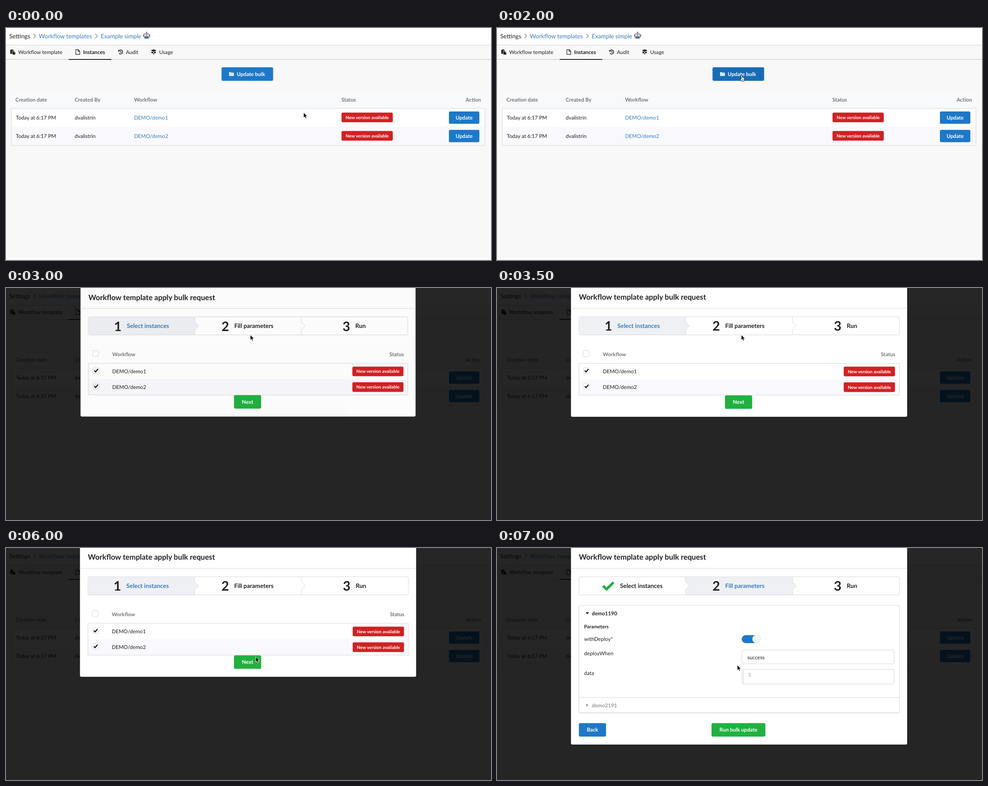
These frames come from a looping animation (1083x517 px, 8000 ms). An HTML page:

```html
<!DOCTYPE html>
<html lang="en">
<head>
<meta charset="utf-8">
<title>Bulk update</title>
<style>
html, body { margin: 0; width: 100%; height: 100%; overflow: hidden; background: #f8f8f8; }
svg { display: block; width: 1083px; height: 517px; }
text { font-family: Lato, sans-serif; text-rendering: geometricPrecision; white-space: pre; }
</style>
</head>
<body>
<svg id="stage" viewBox="0 0 1083 517"></svg>
<script>
const BASE = 11.67, LARGE = 13.33;
const INK = '#212121', GREY = '#767676', LINK = '#3b7abf', LINE = '#d6d6d8';
const BLUE = '#1e78c8', BLUE_HOVER = '#186cb6', BLUE_DOWN = '#1b609f';
const GREEN = '#20b140', GREEN_HOVER = '#17a136', RED = '#d32024';
const ACTIVE = '#eff0f4', STRIPE = '#f9f9fd';

const text = (s, x, y, { size = BASE, bold, fill = INK, anchor = 'start' } = {}) =>
  `<text x="${x}" y="${y}" font-size="${size}" font-weight="${bold ? 700 : 400}" fill="${fill}" text-anchor="${anchor}">${s}</text>`;
const rect = (x, y, w, h, fill, extra = '') =>
  `<rect x="${x}" y="${y}" width="${w}" height="${h}" fill="${fill}" ${extra}/>`;
const path = (d, extra) => `<path d="${d}" ${extra}/>`;
const stroke = (color, w = 1) => `fill="none" stroke="${color}" stroke-width="${w}"`;
const frame = (x, y, w, h, fill = '#fff', r = 3) =>
  rect(x, y, w, h, fill, `rx="${r}" stroke="${LINE}"`);
const group = (id, body) => `<g id="${id}">${body}</g>`;

const button = (label, x, y, w, h, fill, id = '') =>
  rect(x, y, w, h, fill, `rx="3.3" ${id && `id="${id}"`}`) +
  text(label, x + w / 2, y + h / 2 + 4.1, { bold: true, fill: '#fff', anchor: 'middle' });

const badge = (x, y) =>
  rect(x, y, 114.5, 21.5, RED, 'rx="3"') +
  text('New version available', x + 57.25, y + 14.2, { size: 10, bold: true, fill: '#fff', anchor: 'middle' });

const checkbox = (x, y, on) =>
  frame(x, y, 13.4, 13.4, '#fff', 2.5) +
  (on ? path(`M${x + 2.6} ${y + 6.6}l3 3.1l5.4-6.6`, stroke('#111', 2.3)) : '');

const chevron = x => path(`M${x} 13.3l4.6 4.7l-4.6 4.7`, stroke('#a8a8a8', 2));

const icons = {
  paste: path('M9.6 48.4h2.2a1.7 1.7 0 0 1 3 0h2.2v2.2h-3.4v7h-4z', 'fill="#1b1b1b"') +
    path('M14.4 51.4h3.6l2.6 2.6v5.2h-6.2z', 'fill="#1b1b1b"') +
    path('M17.9 51.6v2.6h2.6', stroke('#f8f8f8', .7)),
  file: path('M156 48.1h5.2l3.4 3.4v7.4h-8.6zM161 48.3v3.5h3.5', stroke('#1b1b1b', 1.2)),
  history: path('M252.4 50.6a4.6 4.6 0 1 1-.2 5.4M256.3 50.6v3.2l2 1.3', stroke('#1b1b1b', 1.5)) +
    path('M250.6 48.3v4.2h4.2z', 'fill="#1b1b1b"'),
  signs: path('M325 48.6h8.6l1.8 1.6l-1.8 1.6h-8.6zM334.4 53h-8.6l-1.8 1.6l1.8 1.6h8.6zM329 47.4h1.4v12h-1.4z', 'fill="#1b1b1b"'),
  folder: path('M498 99.2q0-1 1-1h3l1.2 1.4h4.8q1 0 1 1v5.4q0 1-1 1h-9q-1 0-1-1z', 'fill="#d4e5f5"'),
  robot: rect(306, 14, 16, 6, '#cf4c43', 'rx="2"') +
    path('M314 9.5v3', stroke('#777', 1.4)) + '<circle cx="314" cy="9.7" r="1.5" fill="#cf4c43"/>' +
    rect(307.8, 11.6, 12.4, 12.6, '#8fa9b8', 'rx="3.5"') +
    '<circle cx="311.2" cy="16" r="1.8" fill="#e9f6fa"/><circle cx="316.8" cy="16" r="1.8" fill="#e9f6fa"/>' +
    rect(310, 19.8, 8, 2.4, '#4a4f55', 'rx="1"'),
};

function page() {
  const head = { bold: true, fill: GREY };
  const row = (n, y) =>
    text('Today at 6:17 PM', 22, y + 4.2) + text('dvalistrin', 153.5, y + 4.2) +
    text('DEMO/demo' + n, 286, y + 4.2, { fill: LINK }) +
    badge(749.2, y - 11.4) + button('Update', 989, y - 14, 68, 27.5, BLUE);
  return rect(0, 0, 1083, 517, '#f8f8f8') +
    rect(0, 0, 1083, 37.5, '#fff') + rect(0, 37.5, 1083, 1.2, '#d9d9da') +
    text('Settings', 7.3, 22.5, { size: LARGE }) + chevron(61.5) +
    text('Workflow templates', 73.3, 22.5, { size: LARGE, fill: LINK }) + chevron(199.6) +
    text('Example simple', 211.5, 22.5, { size: LARGE, fill: LINK }) + icons.robot +
    icons.paste + icons.file + icons.history + icons.signs +
    text('Workflow template', 27.2, 57.5) + text('Instances', 172.3, 57.5, { bold: true }) +
    text('Audit', 267.7, 57.5) + text('Usage', 342, 57.5) +
    rect(0, 69.3, 1083, 1.4, '#cfcfd0') + rect(140, 69.2, 95, 1.8, '#1b1b1b') +
    rect(481.3, 87.5, 115.2, 30.3, BLUE, 'rx="3.3" id="bulk"') + icons.folder +
    text('Update bulk', 515.2, 106.7, { bold: true, fill: '#fff' }) +
    rect(12, 142, 1057.5, 37, '#f8f9fb') +
    text('Creation date', 21, 164, head) + text('Created By', 153.3, 164, head) +
    text('Workflow', 286, 164, head) + text('Status', 749, 164, head) +
    text('Action', 1060.5, 164, { ...head, anchor: 'end' }) +
    rect(12, 179, 1057.5, 41.5, '#fff') + rect(12, 220.5, 1057.5, 41, STRIPE) +
    rect(12, 179, 1057.5, 82.7, 'none', `stroke="${LINE}"`) +
    row(1, 200) + row(2, 241);
}

function steps(current) {
  const edges = [183, 421.2, 659.8, 898.4];
  const starts = [240.2, 481, 752.3];
  const labels = ['Select instances', 'Fill parameters', 'Run'];
  let out = frame(183, 64, 715.4, 40.5);
  out += rect(edges[current] + .5, 64.5, 237.6, 39.5, ACTIVE);
  for (const i of [0, 1]) {
    const x = edges[i + 1];
    out += path(`M${x} 64v40.5`, stroke(LINE)) +
      path(`M${x - 1} 75.6h1l8.6 8.7l-8.6 8.7h-1z`, `fill="${i === current ? ACTIVE : '#fff'}"`) +
      path(`M${x} 75.6l8.6 8.7l-8.6 8.7`, stroke(LINE));
  }
  labels.forEach((label, i) => {
    const done = i < current;
    out += done
      ? path('M236.8 84.4l8 7.4l15.4-15.2', stroke(GREEN, 5.6))
      : text(i + 1, starts[i], 95.4, { size: 29.17, bold: true });
    out += text(label, starts[i] + (done ? 34.6 : 28.6), 88.9,
      { size: LARGE, bold: true, fill: i === current ? LINK : INK });
  });
  return out;
}

const sheet = bottom =>
  rect(165.2, -10, 750.6, bottom + 10, '#fff', 'rx="3.3"') +
  rect(165.2, 44.8, 750.6, 1, '#d9d9da') +
  text('Workflow template apply bulk request', 182.8, 26.2, { size: 16.67, bold: true });

function selectPane() {
  const head = { bold: true, fill: GREY };
  const row = (n, y) => checkbox(193.3, y - 8.6, true) +
    text('DEMO/demo' + n, 236.2, y + 4.2) + badge(774.2, y - 10.7);
  return sheet(287) + steps(0) +
    checkbox(192.3, 139.5) + text('Workflow', 236.2, 152.2, head) +
    text('Status', 889.5, 152.2, { ...head, anchor: 'end' }) +
    rect(183, 168, 715.4, 35.5, '#fff') + rect(183, 203.5, 715.4, 35.3, STRIPE) +
    rect(183, 168, 715.4, 70.8, 'none', `stroke="${LINE}"`) +
    row(1, 186) + row(2, 221) +
    button('Next', 509, 239.2, 60.8, 30, GREEN, 'next');
}

function paramsPane() {
  return sheet(438) + steps(1) +
    rect(182.7, 129, 716.2, 239.2, '#e4e4e6', 'rx="3"') + frame(182.7, 128, 716.2, 239) +
    path('M197.8 143.2h8l-4 4.2z', 'fill="#1b1b1b"') +
    text('demo1190', 211.8, 149.9, { bold: true }) +
    text('Parameters', 194.5, 179, { size: 10.8, bold: true }) +
    text('withDeploy*', 194.5, 206.6) + text('deployWhen', 194.5, 239.4) + text('data', 194.5, 282.6) +
    rect(546.4, 194.3, 40.8, 17.6, BLUE, 'rx="8.8"') +
    '<circle cx="579.3" cy="203.1" r="9" fill="#f5f5f6" stroke="#dcdcde" stroke-width=".7"/>' +
    frame(546.8, 227.2, 339.8, 31) + text('success', 558.9, 247.5) +
    frame(546.8, 270.4, 339.8, 32.8) + rect(547.3, 270.9, 2.6, 31.8, '#f7f7f7') +
    rect(549.6, 270.5, 1, 32.6, '#d2d2d4') +
    text('1', 561.2, 286, { size: 10.8, fill: '#8c8c8c' }) +
    rect(182.7, 332.6, 716.2, 1, LINE) +
    path('M199.4 346.6v7.4l4.2-3.7z', 'fill="#8f8f8f"') +
    text('demo2191', 211.8, 355, { bold: true, fill: '#979797' }) +
    button('Back', 182.8, 390.2, 60.7, 30, BLUE) +
    button('Run bulk update', 479, 390.2, 120.3, 30, GREEN);
}

const arrow = path('M.4.2v12l2.7-2.5l1.9 4.3l2.2-1l-1.9-4.1h3.7z',
  'fill="#0a0a0a" stroke="#fff" stroke-width=".9" stroke-linejoin="round"');
const hand = path('M2.6 1.5q1.2-1 2 .4l.9 4.1q1-.8 1.7.3q1-.6 1.6.5q1.2-.3 1.4 1.2q.3 3.2-1.2 6.4h-5q-1.3-2.8-3.2-4.7q-.5-1.7 1.2-1.5l1.2.9l-1.2-6.2q-.1-.9.6-1.4z',
  'fill="#fff" stroke="#111" stroke-width="1" stroke-linejoin="round"') +
  path('M5.2 9.5v2.6M6.7 9.5v2.6M8.2 9.5v2.6', stroke('#333', .6));

document.getElementById('stage').innerHTML =
  page() + group('dim', rect(0, 0, 1083, 517, '#000', 'opacity=".85"')) +
  group('select', selectPane()) + group('params', paramsPane()) +
  group('arrow', arrow) + group('hand', hand);

const el = {};
for (const id of ['bulk', 'dim', 'select', 'params', 'next', 'arrow', 'hand']) el[id] = document.getElementById(id);
const show = (node, on) => node.style.display = on ? '' : 'none';

// Each entry keeps the values of the one before unless it sets them.
const timeline = [
  { at: 0, x: 664, y: 188, cursor: 'arrow', bulk: BLUE, next: GREEN, pane: '', entering: false },
  { at: 1500, x: 559, y: 101, cursor: 'hand', bulk: BLUE_HOVER },
  { at: 2000, x: 542.5, y: 104 },
  { at: 2500, bulk: BLUE_DOWN },
  { at: 3000, x: 545, cursor: 'arrow', pane: 'select', entering: true },
  { at: 3500, entering: false },
  { at: 5500, x: 548.5, y: 119 },
  { at: 6000, x: 557, y: 242 },
  { at: 6500, x: 533, y: 260.5, cursor: 'hand', next: GREEN_HOVER },
  { at: 7000, x: 536, y: 260.5, cursor: 'arrow', pane: 'params' },
];
const LOOP = 8000;

function draw(t) {
  const s = Object.assign({}, ...timeline.filter(k => k.at <= t));
  show(el.dim, s.pane);
  show(el.select, s.pane === 'select');
  show(el.params, s.pane === 'params');
  el.select.setAttribute('opacity', s.entering ? .985 : 1);
  el.select.setAttribute('transform', s.entering
    ? 'translate(540.5 130) scale(.9967) translate(-540.5 -130)' : '');
  el.bulk.setAttribute('fill', s.bulk);
  el.next.setAttribute('fill', s.next);
  for (const kind of ['arrow', 'hand']) show(el[kind], s.cursor === kind);
  el[s.cursor].setAttribute('transform', `translate(${s.x} ${s.y})`);
}

const start = performance.now();
function tick() {
  draw((performance.now() - start) % LOOP);
  requestAnimationFrame(tick);
}
tick();
</script>
</body>
</html>
```
